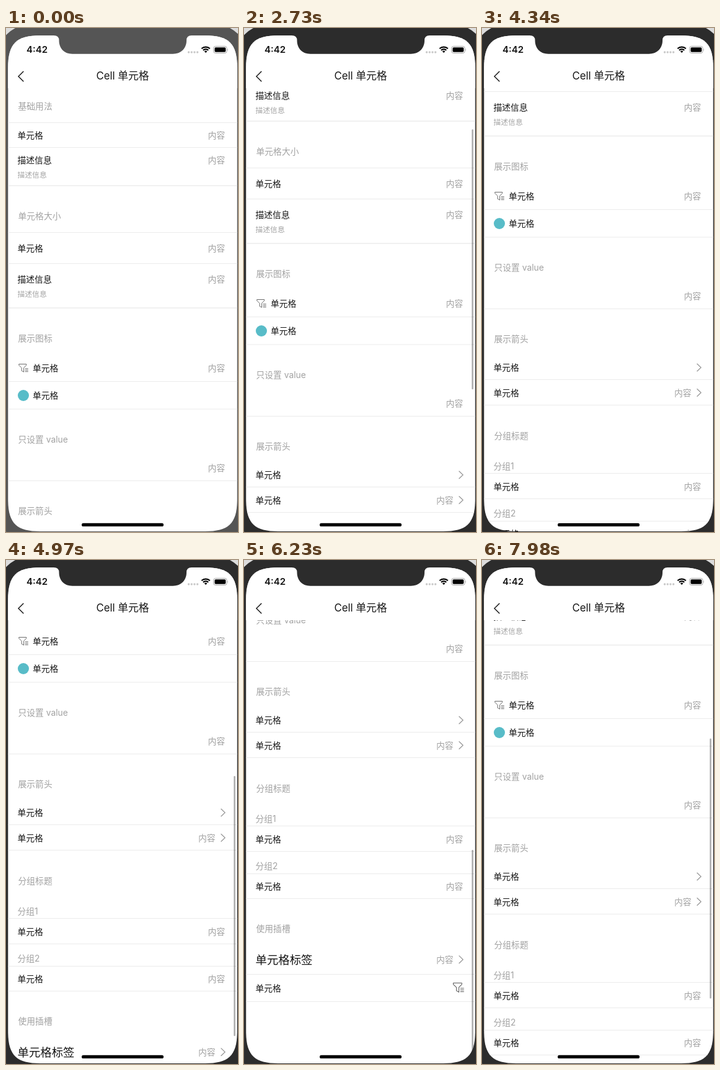
An HTML page that plays this animation: 374 by 812 pixels, repeating every 8000 ms.

```html
<!DOCTYPE html>
<html lang="zh-CN">
<head>
<meta charset="utf-8">
<title>Cell 单元格</title>
<style>
  html, body { margin: 0; width: 100%; height: 100%; overflow: hidden; background: #dcdcdc; }
  svg { display: block; width: 374px; height: 812px; }
  text { font: 13.8px Inter, "Noto Sans CJK SC", "Noto Sans CJK", sans-serif; fill: #151515; }
  .gray { fill: #a2a2a2; }
  .small { font-size: 11.8px; }
  .big { font-size: 18.4px; }
  .nav { font-size: 16.8px; text-anchor: middle; }
  .clock { font-size: 15px; font-weight: 600; }
  .line { stroke: #ebebeb; }
  .strong { stroke: #e2e2e2; }
  .icon { fill: none; stroke: #5c5c5c; stroke-width: .9; stroke-linejoin: round; }
  .arrow { fill: none; stroke: #999; stroke-width: 1.3; }
</style>
</head>
<body>
<svg viewBox="0 0 374 812">
  <defs>
    <clipPath id="screen">
      <path d="M3.300 64C3.300 25 16.600 12 55.300 12H320.700C359.400 12 372.700 25 372.700 64V759C372.700 798 359.400 811 320.700 811H55.300C16.600 811 3.300 798 3.300 759Z"/>
    </clipPath>
    <path id="arrow" class="arrow" d="M346.500-6.300L353 0L346.500 6.300"/>
    <g id="filter" class="icon">
      <path d="M.5.5H12.500V2.200L8.300 6.600V13.200L4.900 11.200V6.600L.5 2.200Z"/>
      <path d="M10.400 7.800H15.500M10.400 10.200H15.500M10.400 12.600H15.500"/>
    </g>
  </defs>

  <rect class="bezel" x="-16" y="-7" width="408" height="837" rx="59"/>
  <g clip-path="url(#screen)">
    <rect width="374" height="812" fill="#fff"/>
    <g id="content"></g>
    <rect id="bar" x="367.200" width="2.500" rx="1.250" fill="#000" fill-opacity=".33"/>
    <rect width="374" height="97" fill="#fff"/>
  </g>

  <path class="bezel" d="M77 11V12Q85.500 12 85.500 20C85.500 33 94 41.700 107 41.700H269C282 41.700 291 33 291 20Q291 12 299 12V11Z"/>
  <text class="clock" x="33" y="40.400">4:42</text>
  <g fill="#c9c9c9">
    <circle cx="294.500" cy="39" r="1.700"/><circle cx="299.200" cy="39" r="1.700"/>
    <circle cx="303.900" cy="39" r="1.700"/><circle cx="308.600" cy="39" r="1.700"/>
  </g>
  <g fill="none" stroke="#000" stroke-width="2.200">
    <path d="M315.300 33.300A9.500 9.500 0 0 1 328.700 33.300M317.900 35.900A5.800 5.800 0 0 1 326.100 35.900"/>
    <path d="M322 40L319.700 37.700A3.200 3.200 0 0 1 324.300 37.700Z" fill="#000" stroke="none"/>
  </g>
  <rect x="334.500" y="29.500" width="21.500" height="11" rx="3.200" fill="none" stroke="#a5a5a5"/>
  <rect x="336.300" y="31.300" width="17.900" height="7.400" rx="1.700"/>
  <path d="M357.300 33.300Q358.900 35 357.300 36.900Z" fill="#a5a5a5"/>

  <path d="M28.300 69.800L20 78L28.300 86.200" fill="none" stroke="#111" stroke-width="1.400"/>
  <text class="nav" x="188" y="83.300">Cell 单元格</text>
  <rect x="122" y="797.800" width="132" height="5.300" rx="2.600"/>
</svg>

<script>
const LOOP = 8000, STEP = 70, MAX_SCROLL = 490;
const $ = q => document.querySelector(q);

// Layout helpers; y is the vertical centre of each item.
const text = (x, y, s, cls = '', size = 13.8) =>
  `<text class="${cls}" x="${x}" y="${(y + size * .38).toFixed(1)}">${s}</text>`;
const heading = (y, s) => text(19.5, y, s, 'gray');
const line = (y, cls = '') => `<path class="line ${cls}" d="M3 ${y}H373"/>`;
const name = (y, s = '单元格', x = 18.5) => text(x, y, s);
const value = (y, x = 325.5) => text(x, y, '内容', 'gray');
const arrow = y => `<use href="#arrow" y="${y}"/>`;
const cell = y => name(y) + value(y);
const linked = y => value(y, 310) + arrow(y);
const described = (y, gap) =>
  name(y, '描述信息') + value(y) + text(18.5, y + gap, '描述信息', 'gray small', 11.8);
const filter = (x, y, k = 1) =>
  `<use href="#filter" transform="translate(${x} ${y}) scale(${k})"/>`;

$('#content').innerHTML = [
  heading(126, '基础用法'), line(152.5),
  cell(172.5), line(192.5),
  described(213, 23.5), line(254, 'strong'),

  heading(303, '单元格大小'), line(329.5),
  cell(355), line(379.5),
  described(405, 23), line(451, 'strong'),

  heading(499.5, '展示图标'),
  filter(20.3, 541), name(548, '单元格', 43), value(548), line(569.5),
  '<circle cx="28" cy="592" r="9" fill="#58bcc8"/>', name(592, '单元格', 43), line(614),

  heading(662.5, '只设置 value'), value(709), line(729.5),

  heading(778, '展示箭头'),
  name(824), arrow(824), line(843.5),
  name(864.5), linked(864.5), line(884.5),

  heading(933.3, '分组标题'),
  text(18.5, 982.3, '分组1', 'gray'), line(994.5), cell(1015.3), line(1035.5),
  text(18.5, 1058.3, '分组2', 'gray'), line(1071.5), cell(1091.7), line(1111.5),

  heading(1160, '使用插槽'),
  text(18.5, 1209.5, '单元格标签', 'big', 18.4), linked(1209.7), line(1233.5),
  name(1255.5), filter(336.8, 1247, 1.15), line(1277.5)
].join('');

// Scroll position over time, joined by a monotone cubic.
const path = [
  [0, 0], [2170, 0], [2450, 45], [2730, 104], [2870, 119], [3360, 119],
  [3640, 205], [3990, 277], [4550, 277], [5040, 440], [5390, 522],
  [5460, 532], [6230, 566], [6370, 566], [7210, 443], [8000, 311]
];
const grade = i => (path[i + 1][1] - path[i][1]) / (path[i + 1][0] - path[i][0]);
const slope = path.map((_, i) => {
  if (i === 0) return grade(0);
  if (i === path.length - 1) return grade(i - 1);
  const a = grade(i - 1), b = grade(i);
  return a * b > 0 ? 2 * a * b / (a + b) : 0;
});

function scrollAt(t) {
  const i = path.findIndex((_, k) => t < path[k + 1][0]);
  const [t0, s0] = path[i], [t1, s1] = path[i + 1];
  const d = t1 - t0, u = (t - t0) / d, v = 1 - u;
  return s0 * v * v * (1 + 2 * u) + s1 * u * u * (1 + 2 * v)
    + d * u * v * (slope[i] * v - slope[i + 1] * u);
}

const fade = (t, from, to) => Math.min(1, Math.max(0, (to - t) / (to - from)));

function barOpacity(t) {
  if (t < 2240) return 0;
  if (t < 3430) return fade(t, 2940, 3220);
  if (t < 4620) return fade(t, 4130, 4340);
  return 1;
}

const content = $('#content'), bar = $('#bar');
const bezel = document.querySelectorAll('.bezel');

function draw(now) {
  const t = Math.floor(now % LOOP / STEP) * STEP;
  const s = scrollAt(t), over = Math.max(0, s - MAX_SCROLL);
  content.setAttribute('transform', `translate(0 ${-Math.round(s)})`);
  bar.setAttribute('y', 102 + .59 * (s - over) + over);
  bar.setAttribute('height', 419 - over);
  bar.setAttribute('opacity', barOpacity(t));
  for (const b of bezel) b.setAttribute('fill', t < 2240 ? '#555' : '#2c2c2c');
}

const start = performance.now();
function tick() {
  draw(performance.now() - start);
  requestAnimationFrame(tick);
}
tick();
</script>
</body>
</html>
```
